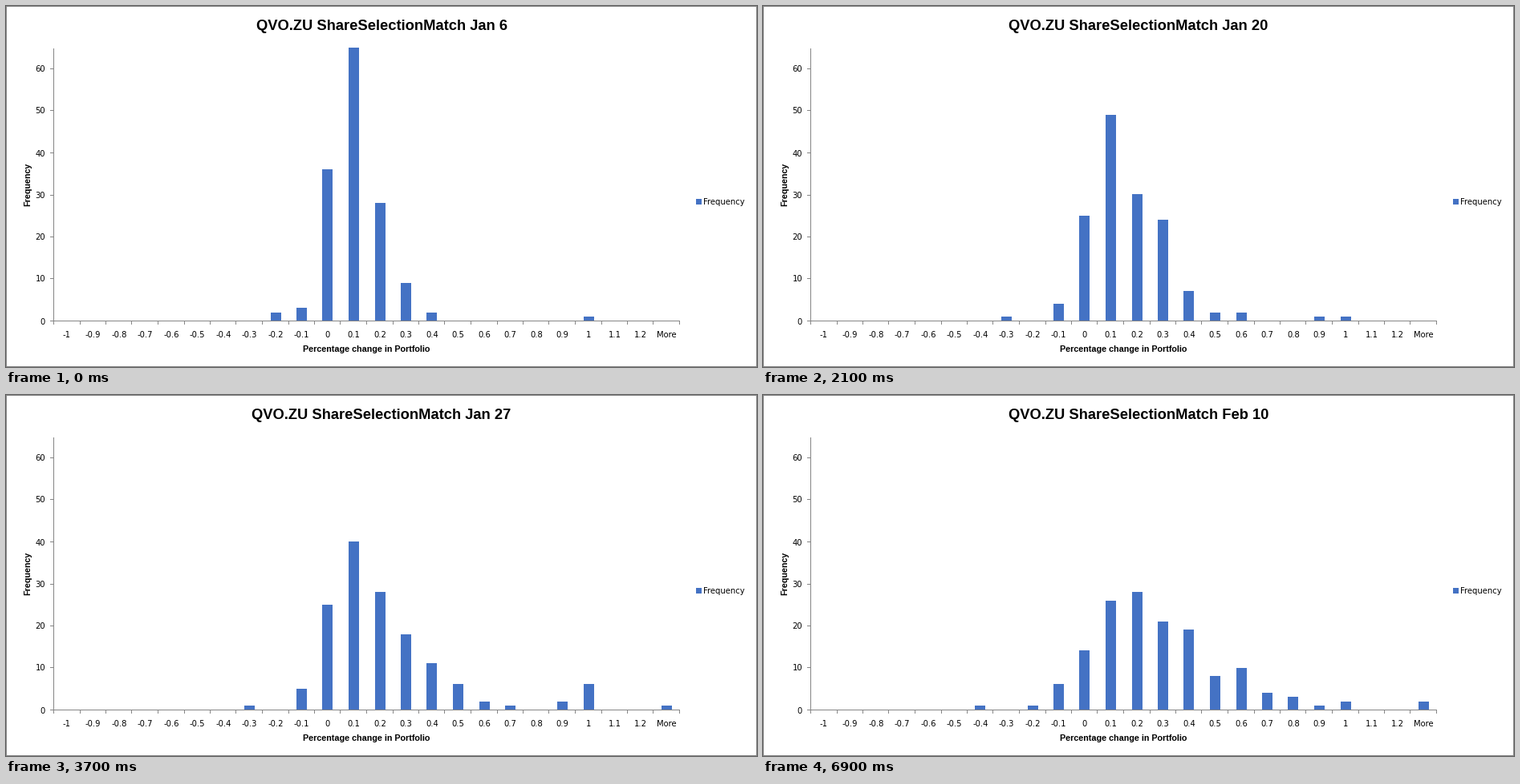
Animation, 936 px wide and 451 px high, one loop 8 s. Source, as a matplotlib script:

```python
import matplotlib.pyplot as plt
from matplotlib.animation import FuncAnimation
from matplotlib.patches import Rectangle

W, H, DPI = 936, 451, 64
STEP, FRAMES = 100, 80
BLUE, GREY = "#4472C4", "#868686"

LEFT, RIGHT, TOP, BASE = 59, 839, 53, 393
UNIT = 5.25                 # pixels per count
Y_MAX = 65
BINS = 24
SLOT = (RIGHT - LEFT) / BINS
BAR_W = 13
FIRST_BIN = 6               # the lower bins stay empty

# start step, date, counts from bin -0.4 up to "More"
WEEKS = [
    (0, "Jan 6", [0, 0, 2, 3, 36, 65, 28, 9, 2, 0, 0, 0, 0, 0, 1, 0, 0, 0]),
    (5, "Jan 13", [0, 0, 2, 4, 24, 52, 41, 13, 6, 2, 0, 1, 0, 0, 1, 0, 0, 0]),
    (21, "Jan 20", [0, 1, 0, 4, 25, 49, 30, 24, 7, 2, 2, 0, 0, 1, 1, 0, 0, 0]),
    (37, "Jan 27", [0, 1, 0, 5, 25, 40, 28, 18, 11, 6, 2, 1, 0, 2, 6, 0, 0, 1]),
    (53, "Feb 3", [1, 0, 0, 6, 20, 33, 37, 20, 11, 3, 2, 2, 2, 1, 0, 5, 2, 1]),
    (69, "Feb 10", [1, 0, 1, 6, 14, 26, 28, 21, 19, 8, 10, 4, 3, 1, 2, 0, 0, 2]),
]

fig = plt.figure(figsize=(W / DPI, H / DPI), dpi=DPI, facecolor="white")
ax = fig.add_axes([0, 0, 1, 1])
ax.set_xlim(0, W)
ax.set_ylim(H, 0)
ax.axis("off")


def box(x, y, w, h, color, z=2):
    patch = Rectangle((x, y), w, h, fc=color, lw=0, antialiased=False, zorder=z)
    return ax.add_patch(patch)


def label(x, y, text, px=10, font="DejaVu Sans", **kw):
    kw = {"ha": "center", "va": "baseline", **kw}
    return ax.text(x, y, text, fontsize=px * 72 / DPI, family=font,
                   color="black", **kw)


def bold(x, y, text, px=10.7, **kw):
    return label(x, y, text, px, "Liberation Sans", weight="bold", **kw)


def draw_frame():
    box(0, 0, W, 1, GREY)
    box(0, H - 1, W, 1, GREY)
    box(0, 0, 1, H, GREY)
    box(W - 1, 0, 1, H, GREY)


def draw_axes():
    box(LEFT, TOP, 1, BASE - TOP, GREY, 3)
    box(LEFT, BASE, RIGHT - LEFT + 1, 1, GREY, 3)
    for count in range(0, 61, 10):
        y = round(BASE - count * UNIT)
        box(LEFT - 4, y, 4, 1, GREY, 3)
        label(49, y + 4.5, str(count), ha="right")
    for i in range(BINS + 1):
        box(round(LEFT + i * SLOT), BASE, 1, 5, GREY, 3)
    for i in range(BINS):
        text = "More" if i == BINS - 1 else f"{(i - 10) / 10:g}"
        label(76 + i * SLOT, 414, text)
    bold(449, 432, "Percentage change in Portfolio")
    bold(29.5, 223, "Frequency", rotation=90, ha="right", va="center",
         rotation_mode="default").set_x(32)


def draw_legend():
    box(860, 241, 7, 7, BLUE)
    label(869.5, 248.5, "Frequency", ha="left")


draw_frame()
draw_axes()
draw_legend()
title = bold(468, 30.5, "", 18.35)
bars = [box(round(69.5 + i * SLOT), BASE, BAR_W, 0, BLUE)
        for i in range(FIRST_BIN, BINS)]


def update(step):
    _, date, counts = [week for week in WEEKS if week[0] <= step][-1]
    title.set_text(f"QVO.ZU ShareSelectionMatch {date}")
    for bar, count in zip(bars, counts):
        height = round(min(count, Y_MAX) * UNIT)
        bar.set_y(BASE - height)
        bar.set_height(height)
        bar.set_visible(count > 0)
    return [title, *bars]


anim = FuncAnimation(fig, update, frames=FRAMES, interval=STEP,
                     repeat=True, repeat_delay=0, blit=False)
plt.show()
```
